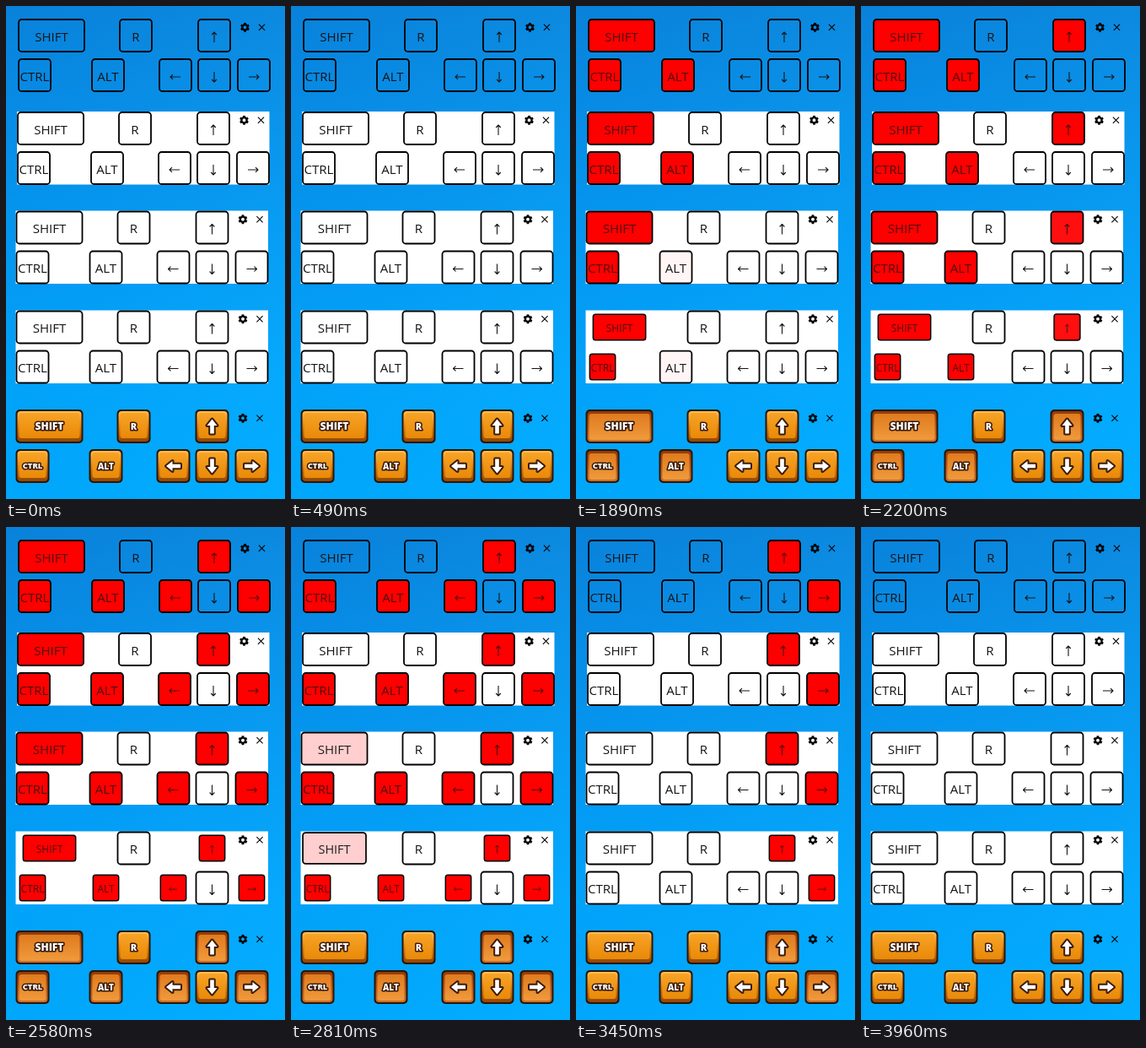
An HTML page with a canvas for the animation above (4890 ms loop, 331x584 px).

```html
<!DOCTYPE html>
<html lang="en">
<head>
<meta charset="utf-8">
<title>Key overlay styles</title>
<style>
html, body { margin: 0; width: 100%; height: 100%; overflow: hidden; background: #0598f0; }
canvas { display: block; width: 100vw; height: 100vh; }
</style>
</head>
<body>
<canvas id="stage"></canvas>
<script>
const W = 331, H = 584, LOOP = 4890, FADE = 150;
const canvas = document.getElementById('stage');
const ratio = window.devicePixelRatio || 1;
canvas.width = Math.round(W * ratio);
canvas.height = Math.round(H * ratio);
const ctx = canvas.getContext('2d');
ctx.scale(ratio, ratio);

// Places are relative to the panel; down and up are press and release times.
const keys = [
  { label: 'SHIFT', x: 0, y: 0, w: 80, size: 12, down: 1520, up: 2690 },
  { label: 'R', x: 120, y: 0, w: 40, size: 11 },
  { turn: -Math.PI / 2, x: 213, y: 0, w: 40, down: 2060, up: 3620 },
  { label: 'CTRL', x: 0, y: 47, w: 40, size: 9.5, down: 1690, up: 2850 },
  { label: 'ALT', x: 87, y: 47, w: 40, size: 10, down: 1885, up: 3008 },
  { turn: Math.PI, x: 167, y: 47, w: 40, down: 2210, up: 3220 },
  { turn: Math.PI / 2, x: 213, y: 47, w: 40 },
  { turn: 0, x: 260, y: 47, w: 40, down: 2370, up: 3790 }
];

const panels = [
  { x: 14, y: 15 },
  { x: 13, y: 125, back: true },
  { x: 11.5, y: 242.5, back: true, fade: true },
  { x: 11.5, y: 360.5, back: true, fade: true, shrink: 0.2 },
  { x: 11.5, y: 478, sprite: true }
];

const clamp = v => Math.max(0, Math.min(1, v));

function pressed(key, t, fade) {
  if (key.down === undefined) return 0;
  if (!fade) return t >= key.down && t < key.up ? 1 : 0;
  return clamp((t - key.down) / FADE) - clamp((t - key.up) / FADE);
}

function box(x, y, w, h, r) {
  ctx.beginPath();
  ctx.roundRect(x, y, w, h, r);
}

function gradient(y0, y1, ...colors) {
  const g = ctx.createLinearGradient(0, y0, 0, y1);
  colors.forEach((c, i) => g.addColorStop(i / (colors.length - 1), c));
  return g;
}

function background() {
  ctx.fillStyle = gradient(0, H, '#0a85dc', '#0792ea', '#049df5', '#02a8fd', '#00adff');
  ctx.fillRect(0, 0, W, H);
  const g = ctx.createLinearGradient(0, 0, W, 0);
  g.addColorStop(0, 'rgba(0,80,190,0.07)');
  g.addColorStop(1, 'rgba(40,180,255,0.09)');
  ctx.fillStyle = g;
  ctx.fillRect(0, 0, W, H);
}

function thinArrow(turn) {
  ctx.save();
  ctx.translate(0, 2);
  ctx.rotate(turn);
  ctx.beginPath();
  ctx.moveTo(-6, 0);
  ctx.lineTo(6, 0);
  ctx.moveTo(3, -2.8);
  ctx.lineTo(6, 0);
  ctx.lineTo(3, 2.8);
  ctx.lineWidth = 1.1;
  ctx.strokeStyle = '#151515';
  ctx.stroke();
  ctx.restore();
}

function flatKey(key, p, panel) {
  const scale = 1 - (panel.shrink || 0) * p;
  ctx.save();
  ctx.translate(key.x + key.w / 2, key.y + 20);
  ctx.scale(scale, scale);
  box(1 - key.w / 2, -19, key.w - 2, 38, 3.5);
  if (p > 0) {
    ctx.fillStyle = `rgba(255,0,0,${p})`;
    ctx.fill();
  }
  ctx.lineWidth = 1.8;
  ctx.strokeStyle = '#000';
  ctx.stroke();
  ctx.globalAlpha = 1 - 0.25 * p;
  if (key.label) {
    ctx.font = '15px "Open Sans", "Noto Sans", sans-serif';
    ctx.fillStyle = '#151515';
    ctx.fillText(key.label, 0, 6.7);
  } else {
    thinArrow(key.turn);
  }
  ctx.restore();
}

function blockArrow(turn) {
  ctx.rotate(turn);
  ctx.beginPath();
  ctx.moveTo(-8.5, -2.3);
  ctx.lineTo(1, -2.3);
  ctx.lineTo(1, -6);
  ctx.lineTo(8.5, 0);
  ctx.lineTo(1, 6);
  ctx.lineTo(1, 2.3);
  ctx.lineTo(-8.5, 2.3);
  ctx.closePath();
  ctx.lineWidth = 4;
  ctx.strokeStyle = '#3b1c08';
  ctx.stroke();
  ctx.fillStyle = '#fff';
  ctx.fill();
}

function spriteKey(key, p) {
  const half = key.w / 2;
  ctx.save();
  ctx.translate(key.x + half, key.y + 20);
  box(-half, -20, key.w, 40, 5);
  ctx.fillStyle = '#2c1507';
  ctx.fill();
  box(2 - half, -18, key.w - 4, 36, 4);
  ctx.fillStyle = p ? gradient(-18, 18, '#8f3b0b', '#b6571a', '#c9702c')
                    : gradient(-18, 18, '#ffc158', '#dc8110', '#8d4507');
  ctx.fill();
  box(4 - half, p ? -15 : -16, key.w - 8, p ? 31 : 30, 3);
  ctx.fillStyle = p ? gradient(-16, 16, '#df7a1d', '#f09a3c')
                    : gradient(-16, 14, '#f7a326', '#e98908');
  ctx.fill();
  if (key.label) {
    ctx.font = `800 ${key.size}px "Open Sans", "Noto Sans", sans-serif`;
    ctx.lineWidth = 3.2;
    ctx.strokeStyle = '#3b1c08';
    ctx.strokeText(key.label, 0, key.size * 0.36);
    ctx.fillStyle = '#fff';
    ctx.fillText(key.label, 0, key.size * 0.36);
  } else {
    blockArrow(key.turn);
  }
  ctx.restore();
}

function icons() {
  ctx.save();
  ctx.translate(269.5, 10.3);
  ctx.strokeStyle = '#000';
  ctx.lineWidth = 2.3;
  ctx.beginPath();
  ctx.arc(0, 0, 3.1, 0, Math.PI * 2);
  ctx.stroke();
  ctx.fillStyle = '#000';
  for (let i = 0; i < 6; i++) {
    ctx.fillRect(-1.4, -5.4, 2.8, 2);
    ctx.rotate(Math.PI / 3);
  }
  ctx.translate(20, 0);
  ctx.lineWidth = 1.1;
  ctx.beginPath();
  ctx.moveTo(-3.6, -3.6);
  ctx.lineTo(3.6, 3.6);
  ctx.moveTo(3.6, -3.6);
  ctx.lineTo(-3.6, 3.6);
  ctx.stroke();
  ctx.restore();
}

function drawPanel(panel, t) {
  ctx.save();
  ctx.translate(panel.x, panel.y);
  if (panel.back) {
    ctx.fillStyle = '#fff';
    ctx.fillRect(0, 0, 299.5, 86.5);
  }
  for (const key of keys) {
    const p = pressed(key, t, panel.fade);
    if (panel.sprite) spriteKey(key, p);
    else flatKey(key, p, panel);
  }
  icons();
  ctx.restore();
}

function draw(t) {
  ctx.textAlign = 'center';
  ctx.textBaseline = 'alphabetic';
  ctx.lineJoin = 'round';
  background();
  for (const panel of panels) drawPanel(panel, t);
}

const start = performance.now();
function tick() {
  draw((performance.now() - start) % LOOP);
  requestAnimationFrame(tick);
}
tick();
</script>
</body>
</html>
```
